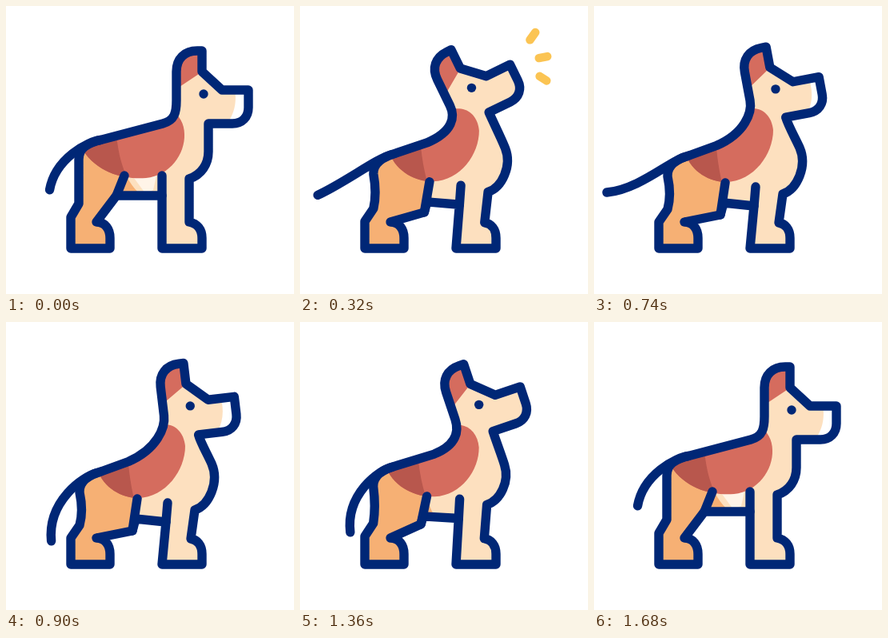
These frames come from a looping animation (360 by 360 pixels, 2400 ms). An HTML page:

```html
<!DOCTYPE html>
<html lang="en">
<head>
<meta charset="utf-8">
<title>Barking dog</title>
<style>
  html, body { margin: 0; width: 100%; height: 100%; overflow: hidden; background: #fff; }
  svg { display: block; width: 100vw; height: 100vh; }
  .line { fill: none; stroke: #002776; stroke-width: 11.4; stroke-linecap: round; stroke-linejoin: round; }
  .bark { stroke: #fbc453; stroke-width: 10.5; stroke-linecap: round; }
</style>
</head>
<body>
<svg viewBox="0 0 360 360">
  <defs>
    <clipPath id="inside"><path id="inner"/></clipPath>
    <clipPath id="rump"><path id="rumpShape"/></clipPath>
  </defs>
  <g clip-path="url(#inside)">
    <rect width="360" height="360" fill="#fde0bf"/>
    <path id="hind" fill="#f6b074"/>
    <path id="belly" fill="#fff4e8"/>
    <path id="patch" fill="#d56c5e"/>
    <path id="shade" fill="#b8574d" clip-path="url(#rump)"/>
    <path id="ear" fill="#d56c5e"/>
    <path id="muzzle" fill="#fff"/>
  </g>
  <path id="tail" class="line"/>
  <path id="outline" class="line"/>
  <path id="legs" class="line"/>
  <circle id="eye" r="5.7" fill="#002776"/>
  <g id="barks"></g>
</svg>
<script>
const LOOP = 2400, RAD = Math.PI / 180;
const $ = id => document.getElementById(id);
const clamp = v => Math.min(1, Math.max(0, v));
const lerp = (a, b, k) => a + (b - a) * k;
const ease = u => (1 - Math.cos(Math.PI * clamp(u))) / 2;

// Keys are [time, value] pairs, eased in and out between neighbours.
const crouchKeys = [[0, 0], [420, 1], [1150, 1], [1680, 0]];
const headKeys = [[0, 0], [350, 26.5], [900, 6.8], [1145, 28.5], [1680, 0]];
const tailKeys = [[0, 51], [350, 31], [560, 66], [740, 26], [930, 66],
                  [1165, 26], [1380, 66], [1680, 51]];
const barkStarts = [300, 980];

// Start and end of each bark stroke.
const barkLines = [[287, 43, 309.5, 11.5], [298, 65.2, 333, 58.7], [299, 87.5, 328, 106]];

// Each pair holds the standing and the crouching version of a path.
const shapes = {
  under: [
    "C253,158 253,170 253,182 C253,198 244,211 229,216 L229,270 C239,272 245,279 245,290 L245,303 L195,303 L195,237 L138,237 L138,237 L113,270",
    "C243,150 251,164 257,177 C267,200 254,229 236,235 L231,271 C239,272 245,279 245,290 L245,303 L195,303 L200,250 L162,246 L158,261 L113,270"],
  rear: [
    "C124,270 130,279 130,290 L130,303 L81,303 L81,264 L91,247 C91,230 91,210 91,192 C91,178 100,172 120,167 L196,147 C211,143",
    "C124,270 130,279 130,290 L130,303 L81,303 L81,270 L92,254 C95,243 95,227 92,213 C91,201 101,192 120,186.5 L153,174.5 C189,159"],
  legs: [
    "M195,237 L195,212 M138,237 L148,212",
    "M200,250 L202,226 M158,261 L164,221"],
  hind: [
    "M137,150 C140,190 148,222 174,240 L140,280 L140,310 L60,310 L60,150 Z",
    "M152,165 C154,195 158,215 166,246 L158,280 L140,310 L60,310 L60,150 Z"],
  belly: [
    "M160,215 L188,212 L184,230 L174,234 Z",
    "M162,235 L162,235 L162,240 L162,240 Z"],
  patch: [
    "M96,180 C115,210 150,217 175,215 C205,212 224,185 223,160 C223,148 217,136 206,130 L190,130 L100,160 Z",
    "M114,184 C122,208 145,220 165,220 C200,219 224,185 224,155 C222,138 212,128 198,128 L180,128 L114,175 Z"]
};

const SVG = "http://www.w3.org/2000/svg";
const strokes = barkLines.map(() => {
  const line = document.createElementNS(SVG, "line");
  line.setAttribute("class", "bark");
  return $("barks").appendChild(line);
});

function track(keys, t) {
  for (let i = 1; i < keys.length; i++) {
    const [t0, a] = keys[i - 1], [t1, b] = keys[i];
    if (t < t1) return lerp(a, b, ease((t - t0) / (t1 - t0)));
  }
  return keys[keys.length - 1][1];
}

function blend([from, to], k) {
  const goal = to.match(/[\d.]+/g);
  let i = 0;
  return from.replace(/[\d.]+/g, n => lerp(+n, +goal[i++], k).toFixed(2));
}

// Turns head coordinates around the neck, which slides back while crouching.
function headTurner(angle, crouch) {
  const c = Math.cos(angle * RAD), s = Math.sin(angle * RAD);
  const px = lerp(224, 213, crouch), py = lerp(157, 154.3, crouch);
  return path => path.replace(/([\d.]+),([\d.]+)/g, (_, x, y) => {
    const dx = x - 224, dy = y - 157;
    return (px + dx * c + dy * s).toFixed(2) + "," + (py - dx * s + dy * c).toFixed(2);
  });
}

function tailPath(angle, crouch) {
  const x = lerp(103, 96, crouch), y = lerp(170, 194, crouch);
  const length = lerp(77, 89, crouch);
  const bend = lerp(25, 1.2 * (angle - 39), crouch);
  const along = (r, a) => `${x - r * Math.cos(a * RAD)},${y + r * Math.sin(a * RAD)}`;
  const root = `${lerp(118, 114, crouch)},${lerp(167.5, 188.5, crouch)}`;
  return `M${root} C${x},${y - 1} ${along(length * 0.6, angle - bend)} ${along(length, angle)}`;
}

function drawBarks(t) {
  const age = t - (t < barkStarts[1] ? barkStarts[0] : barkStarts[1]);
  const front = 1 - (1 - clamp(age / 120)) ** 2;
  const back = ease(age / 230);
  $("barks").style.display = age > 0 && age < 215 ? "" : "none";
  barkLines.forEach(([x1, y1, x2, y2], i) => {
    const ends = { x1: lerp(x1, x2, back), y1: lerp(y1, y2, back),
                   x2: lerp(x1, x2, front), y2: lerp(y1, y2, front) };
    for (const name in ends) strokes[i].setAttribute(name, ends[name]);
  });
}

function draw(t) {
  const crouch = track(crouchKeys, t);
  const tilt = track(headKeys, t);
  const turn = headTurner(tilt, crouch);
  const setPath = (id, d) => $(id).setAttribute("d", d);
  const pose = name => blend(shapes[name], crouch);

  const body = turn("M213,118 L213,82 C213,66 223,56 239,56 L245,56 L245,82 L270,105 L303,105 L303,127 C303,139 295,147 283,147 L253,147 ")
    + pose("under") + " " + pose("rear") + turn(" 213,133 213,118 Z");
  setPath("inner", body);
  setPath("outline", body);
  setPath("legs", pose("legs"));
  setPath("hind", pose("hind"));
  setPath("rumpShape", pose("hind"));
  setPath("belly", pose("belly"));
  $("belly").setAttribute("fill-opacity", clamp(1 - 1.6 * crouch));
  setPath("patch", pose("patch"));
  setPath("shade", pose("patch"));
  setPath("tail", tailPath(track(tailKeys, t), crouch));
  setPath("ear", turn("M200,112 L217,101 L244,83 L258,74 L258,45 L200,45 Z"));

  const edge = 285 + 14 * clamp((tilt - 7) / 12);
  setPath("muzzle", turn(`M${edge},98 C${edge + 4},116 ${edge + 2},132 ${edge - 8},146 L${edge - 8},152 L312,152 L312,98 Z`));

  const [ex, ey] = turn("247,110").split(",");
  $("eye").setAttribute("cx", ex);
  $("eye").setAttribute("cy", ey);
  drawBarks(t);
}

const start = performance.now();
function tick() {
  draw((performance.now() - start) % LOOP);
  requestAnimationFrame(tick);
}
draw(0);
requestAnimationFrame(tick);
</script>
</body>
</html>
```
